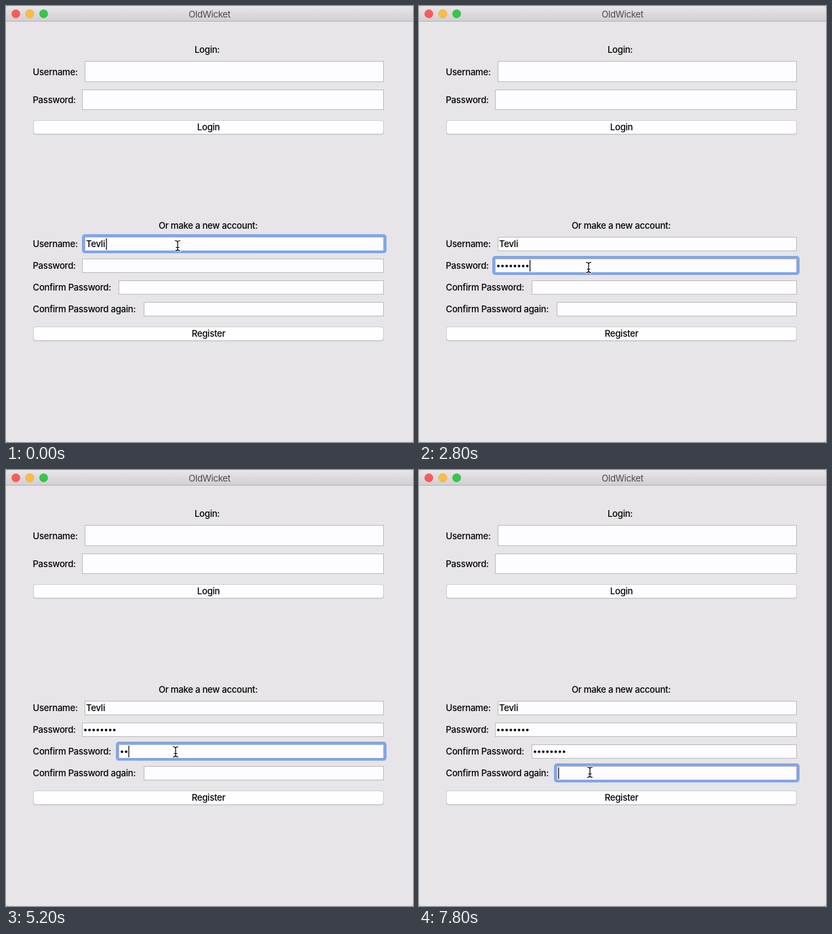
Write an HTML page that moves like this. It is 600 px wide and 642 px high and loops after 8000 ms.

```html
<!DOCTYPE html>
<html lang="en">
<head>
<meta charset="utf-8">
<title>Account form</title>
<style>
  html, body { margin: 0; width: 100%; height: 100%; overflow: hidden; background: #c4c2c5; }
  svg { display: block; width: 600px; height: 642px; }
  text { font: 500 13.2px Inter, "Open Sans", sans-serif; letter-spacing: -0.28px; fill: #000; }
  .mid { text-anchor: middle; }
  .title { fill: #4b494b; font-weight: 400; }
  .field { fill: #fdfcfe; stroke: #bdbbbe; }
  .button { fill: #fefdff; stroke: #cfcdd0; }
</style>
</head>
<body>
<svg id="stage" viewBox="0 0 600 642" xmlns="http://www.w3.org/2000/svg">
  <defs>
    <linearGradient id="bar" x1="0" y1="0" x2="0" y2="1">
      <stop offset="0" stop-color="#e8e6e8"/>
      <stop offset="1" stop-color="#d1cfd1"/>
    </linearGradient>
    <path id="beam" d="M-3.5-7.5Q-.5-7.5 0-5.5Q.5-7.5 3.5-7.5M0-5.5V5.5M-3.5 7.5Q-.5 7.5 0 5.5Q.5 7.5 3.5 7.5M-2 2.5H2"/>
  </defs>
  <rect width="600" height="642" rx="4" fill="#e7e5e8"/>
  <path d="M0 22V4Q0 0 4 0H596Q600 0 600 4V22Z" fill="url(#bar)"/>
  <rect y="22" width="600" height="1" fill="#b5b3b5"/>
  <g id="form"></g>
  <rect id="ring" fill="none" stroke="#81a5e8" stroke-width="4" rx="2.5"/>
  <g id="dots"></g>
  <rect id="caret" width="1.2" height="17" fill="#000"/>
  <g id="mouse" fill="none" stroke-linecap="round">
    <use href="#beam" stroke="#fff" stroke-width="2.8"/>
    <use href="#beam" stroke="#000" stroke-width="1.2"/>
  </g>
</svg>
<script>
const LOOP = 8000, STEP = 100, BLINK = 500, RIGHT = 557, PITCH = 6.1;
const $ = id => document.getElementById(id);

function set(el, attrs) {
  for (const key in attrs) el.setAttribute(key, attrs[key]);
}

function add(parent, tag, attrs, content = "") {
  const el = document.createElementNS("http://www.w3.org/2000/svg", tag);
  set(el, attrs);
  el.textContent = content;
  parent.append(el);
  return el;
}

const form = $("form");
const label = (str, x, y, cls = "") => add(form, "text", { x, y, class: cls }, str);
const show = on => on ? "visible" : "hidden";

function box(x, y, h, cls, rx = 0) {
  add(form, "rect", { x: x + .5, y: y + .5, width: RIGHT - x - 1, height: h - 1, rx, class: cls });
}

function button(str, y) {
  add(form, "rect", { x: 40, y: y + .5, width: RIGHT - 40, height: 21, rx: 4, fill: "#b9b7ba" });
  box(40, y, 21, "button", 3.5);
  label(str, 298.5, y + 15, "mid");
}

// Registration fields; "keys" holds the times at which a character is typed.
const fields = [
  { name: "Username:", x: 116, y: 340, focus: 0, keys: [] },
  { name: "Password:", x: 112, y: 372, focus: 500,
    keys: [1000, 1200, 1400, 1600, 2000, 2400, 2600, 2800] },
  { name: "Confirm Password:", x: 166, y: 404, focus: 3600,
    keys: [5000, 5200, 5400, 5600, 6000, 6500, 6600, 6800] },
  { name: "Confirm Password again:", x: 203, y: 436, focus: 7700, keys: [] }
];

const moves = [
  { from: 0, to: 500, a: [253, 353], b: [250, 385] },
  { from: 3000, to: 3600, a: [250, 385], b: [250, 415] },
  { from: 7000, to: 7800, a: [250, 415], b: [252, 445] }
];

function build() {
  [["#fc5b57", "#e2443f"], ["#fdbc40", "#e0a033"], ["#34c84a", "#27aa35"]].forEach(([fill, stroke], i) =>
    add(form, "circle", { cx: 14.5 + 20.5 * i, cy: 11.5, r: 6, fill, stroke, "stroke-width": .6 }));
  label("OldWicket", 300, 16.5, "mid title");
  label("Login:", 296.5, 69, "mid");
  label("Username:", 39.5, 101.5);
  box(116, 81, 31, "field");
  label("Password:", 39.5, 143);
  box(112, 123, 30, "field");
  button("Login", 168);
  label("Or make a new account:", 298, 328, "mid");
  for (const f of fields) {
    label(f.name, 39.5, f.y + 15);
    box(f.x, f.y, 21, "field");
    f.dots = f.keys.map((_, i) =>
      add($("dots"), "circle", { cx: f.x + 5 + PITCH * i, cy: f.y + 10.8, r: 1.9 }));
  }
  label("Tevli", 118, 355);
  button("Register", 472);
}

function pointer(t) {
  const m = moves.filter(m => m.from <= t).pop();
  const p = Math.min(1, (t - m.from) / (m.to - m.from));
  const e = p * p * (3 - 2 * p);
  return m.a.map((v, i) => v + (m.b[i] - v) * e);
}

function draw(t) {
  for (const f of fields)
    f.dots.forEach((dot, i) => set(dot, { visibility: show(t >= f.keys[i]) }));

  const f = fields.filter(f => f.focus <= t).pop();
  set($("ring"), { x: f.x - 2, y: f.y - 2, width: RIGHT - f.x + 4, height: 24 });

  const typed = f.keys.filter(k => k <= t);
  const last = typed.length ? typed[typed.length - 1] : f.focus;
  const named = f === fields[0];
  set($("caret"), {
    x: named ? 147.5 : f.x + 2.2 + PITCH * typed.length,
    y: f.y + 2,
    visibility: show(Math.floor((t - last) / BLINK) % 2 === 0)
  });
  set($("mouse"), { transform: `translate(${pointer(t).join(" ")})` });
}

build();
const start = performance.now();
function tick() {
  const t = (performance.now() - start) % LOOP;
  draw(Math.floor(t / STEP) * STEP);
  requestAnimationFrame(tick);
}
tick();
</script>
</body>
</html>
```
